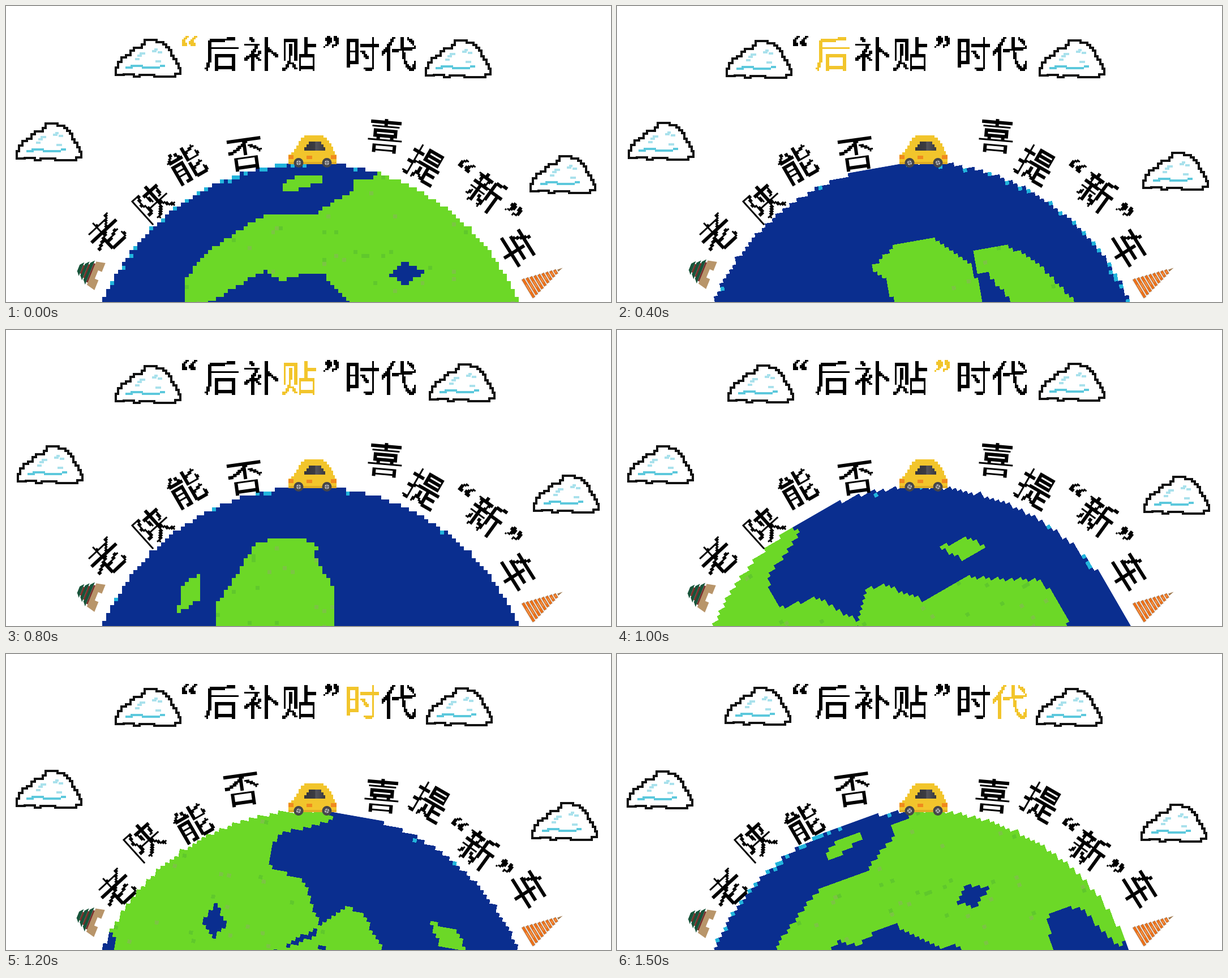
Recreate the animation shown at these times as an HTML page with a canvas. Size 1069 by 524 pixels, loop 1600 ms.

```html
<!DOCTYPE html>
<html lang="zh-CN">
<head>
<meta charset="utf-8">
<title>“后补贴”时代</title>
<style>
html, body { margin: 0; width: 100%; height: 100%; overflow: hidden; background: #fff; }
#stage { position: relative; width: 100%; height: 100%; overflow: hidden; contain: strict; }
#globe {
  position: absolute; left: 142px; top: 279px; width: 792px; height: 792px;
  image-rendering: pixelated;
}
svg { position: absolute; left: 0; top: 0; width: 100%; height: 100%; }
text {
  font: 400 65px "Noto Sans CJK SC", "Noto Sans CJK", sans-serif;
  text-anchor: middle; fill: #000; stroke: #000; stroke-width: .6px; filter: url(#pixel);
}
text.quote { font: 700 62px "Liberation Serif", serif; }
text.hot { fill: #f2c52c; stroke: #f2c52c; }
</style>
</head>
<body>
<div id="stage">
<canvas id="globe" width="114" height="114"></canvas>
<svg id="scene" viewBox="0 0 1069 524">
  <defs>
    <filter id="pixel" color-interpolation-filters="sRGB">
      <feComponentTransfer in="SourceGraphic" result="crisp">
        <feFuncA type="discrete" tableValues="0 1"/>
      </feComponentTransfer>
      <feFlood x="1" y="1" width="1" height="1"/>
      <feComposite x="0" y="0" width="3" height="3"/>
      <feTile result="dots"/>
      <feComposite in="crisp" in2="dots" operator="in"/>
      <feComponentTransfer>
        <feFuncA type="discrete" tableValues="0 1 1 1 1"/>
      </feComponentTransfer>
      <feMorphology operator="dilate" radius="1"/>
    </filter>
    <linearGradient id="glass">
      <stop offset="0" stop-color="#34343a"/><stop offset=".5" stop-color="#3c3c42"/>
      <stop offset=".55" stop-color="#55555c"/><stop offset="1" stop-color="#38383e"/>
    </linearGradient>
    <g id="cloud" fill="none" stroke-width="3.6" shape-rendering="crispEdges">
      <path fill="#fff" stroke="#111" d="M2 64V51H6V41H12V33H20V29H28V21H34V16H48V10H53V2H74V6H86V10H91V15H96V20H100V30H104V36H109V44H113V52H116V62H107V67H70V64H44V67H34V63H16V64Z"/>
      <path stroke="#5cc8dc" d="M19 51H30V48H50M48 51H80M80 48H89"/>
      <path stroke="#a9e1ec" d="M40 30H46V26H54M66 22H72V19H76M76 24H84M36 36H44M72 40H82"/>
    </g>
    <g id="wheel">
      <circle r="8.5" fill="#45454a"/><circle r="4" fill="#b9b9bd"/>
      <path d="M-4 0H4M0-4V4" stroke="#66666b" stroke-width="1.6"/>
    </g>
  </defs>

  <g id="gate"></g>
  <g id="pagoda" transform="translate(921 501) rotate(-31)"></g>

  <g shape-rendering="crispEdges">
    <path fill="#f2c52c" d="M527 229H561V233H567V238H571V243H575V249H578V257H581V263H584V280H499V263H504V259H509V253H513V247H517V239H521V233H527Z"/>
    <path fill="#e0ac24" d="M499 276H584V280H499Z"/>
    <path fill="url(#glass)" d="M527 256V250H531V245H535V240H557V245H561V250H564V256Z"/>
    <path fill="#f08a1e" d="M499 264H508V271H499ZM531 265H541V271H531ZM574 264H584V271H574Z"/>
  </g>
  <use class="wheel" href="#wheel"/>
  <use class="wheel" href="#wheel"/>
</svg>
</div>

<script>
const NS = 'http://www.w3.org/2000/svg';
const $ = id => document.getElementById(id);
const scene = $('scene');
const CX = 538, CY = 675, N = 114, CELL = 792 / N, RADIUS = 398;
const TICKS = 16, STEP = 20;
const rad = deg => deg * Math.PI / 180;

function add(parent, name, attrs) {
  const el = document.createElementNS(NS, name);
  for (const k in attrs) el.setAttribute(k, attrs[k]);
  return parent.appendChild(el);
}
const place = (el, x, y, turn = 0) =>
  el.setAttribute('transform', `translate(${x} ${y}) rotate(${turn})`);

// A rough coastline, outlined on stage with the globe turned by `turn` degrees.
const shape = (turn, outline) => ({
  cos: Math.cos(rad(turn)), sin: Math.sin(rad(turn)), path: new Path2D(`M${outline}Z`)
});
const land = [
  shape(0, '659,280 659,295 612,327 545,368 450,373 370,425 333,460 319,482 319,540 357,540 357,506 455,468 490,487 525,474 560,474 590,507 625,540 1000,540 1000,280'),
  shape(0, '485,327 490,313 515,302 557,302 557,312 510,327'),
  shape(40, '335,570 340,508 380,460 470,452 555,515 555,570'),
  shape(40, '455,435 475,405 525,375 600,385 650,508 620,490 610,465 525,450 480,442'),
  shape(120, '575,570 625,468 665,450 725,482 733,570'),
  shape(180, '372,540 372,488 440,380 485,366 525,366 583,465 577,540'),
  shape(240, '420,540 440,460 470,450 545,480 620,438 735,445 798,515 795,540'),
  shape(240, '568,385 620,368 652,382 615,407'),
  shape(280, '575,270 575,295 480,320 461,372 530,405 550,470 555,540 192,540 192,490 100,490 100,270')
];
const lakes = [
  shape(0, '675,474 705,453 740,470 705,495'),
  shape(280, '550,485 545,500 470,530 510,505')
];

function random(seed) {
  return () => (seed = (seed * 16807) % 2147483647) / 2147483647;
}

function paintGlobe() {
  const g = $('globe').getContext('2d');
  const rnd = random(77);
  const at = i => (i - N / 2 + .5) * CELL;
  const covers = (x, y) => s =>
    g.isPointInPath(s.path, CX + x * s.cos - y * s.sin, CY + x * s.sin + y * s.cos);
  for (let j = 0; j < N; j++) for (let i = 0; i < N; i++) {
    const x = at(i), y = at(j), r = Math.hypot(x, y), hit = covers(x, y);
    if (r > RADIUS) continue;
    const luck = rnd();
    let color;
    if (land.some(hit) && !lakes.some(hit)) {
      color = luck < .009 ? '#60c82c' : luck < .018 ? '#7cc444' : '#6cd827';
    } else {
      const foam = r < RADIUS - CELL ? 0 : x < 0 && y < -90 ? .3 : .04;
      color = luck < foam ? '#22b4dc' : '#0a2e8f';
    }
    g.fillStyle = color;
    g.fillRect(i, j, 1, 1);
  }
}

function paintGate() {
  const tower = $('gate');
  add(tower, 'path', { d: 'M-26 0L-22-16H22L26 0H9V-7H-7V0Z', fill: '#b8956a' });
  for (let i = 0; i < 3; i++) {
    const y = -16 - i * 8, w = 20 - i * 5;
    add(tower, 'rect', { x: -w + 2, y: y - 3, width: 2 * w - 4, height: 3, fill: '#7a2f2a' });
    add(tower, 'path', { d: `M${-w - 3} ${y - 3}H${w + 3}L${w - 4} ${y - 9}H${4 - w}Z`, fill: '#17543a' });
  }
}

function paintPagoda() {
  for (let i = 0; i < 9; i++) {
    const x = i * 7, h = 19 - i * 1.85;
    add($('pagoda'), 'path', { d: `M${x} ${-h}V${h}h5V${-h}Z`, fill: '#ec7018', stroke: '#a08a74', 'stroke-width': .7 });
    add($('pagoda'), 'path', { d: `M${x + 2.5} ${-h * .4}V${h * .4}`, stroke: '#f6a868', 'stroke-width': 1.2 });
  }
  add($('pagoda'), 'path', { d: 'M63 -2L73 0L63 2Z', fill: '#a07a50' });
}

const isQuote = ch => '“”'.includes(ch);
function glyph(ch) {
  const el = add(scene, 'text', { y: isQuote(ch) ? 32 : 24 });
  el.classList.toggle('quote', isQuote(ch));
  el.textContent = ch;
  return el;
}

const title = [['“', 323], ['后', 381], ['补', 451], ['贴', 518], ['”', 576], ['时', 629], ['代', 694]]
  .map(([ch, x]) => {
    const el = glyph(ch);
    place(el, x, isQuote(ch) ? 62 : 85);
    return el;
  });

// character, bearing from the globe's centre, tilt, first bob direction
const arc = [
  ['老', -53, -43, 1], ['陕', -40.5, -42, -1], ['能', -29, -30, 1], ['否', -15.5, -8, -1],
  ['喜', 16.5, 5, 1], ['提', 27, 30, -1], ['“', 35, 38, 1], ['新', 42, 36, 1],
  ['”', 49, 38, 1], ['车', 56, 58, -1]
].map(([ch, bearing, tilt, bob]) => ({
  el: glyph(ch), bearing: rad(bearing), tilt, bob,
  orbit: (bearing < 0 ? 441 : 453) + (isQuote(ch) ? 16 : 0)
}));

const wave = (mid, amp, peak, cycles = 1) =>
  tick => Math.round(mid + amp * Math.cos(2 * Math.PI * cycles * (tick - peak) / TICKS));
const cloud = (x, y) => ({ el: add(scene, 'use', { href: '#cloud' }), x, y, tilt: 0 });
const drifters = [
  cloud(wave(192, 2.5, 2, 2), wave(60, 2, 8)),
  cloud(wave(743.5, 3.5, 7), wave(59, 1, 6, 2)),
  cloud(wave(18, 1.5, 6), wave(205, 1, 0)),
  cloud(wave(928, 3, 8), wave(260, 4.5, 15)),
  { el: $('gate'), x: wave(166, 1, 4), y: wave(477, 2, 0), tilt: -68 }
];
const wheels = [...document.querySelectorAll('.wheel')];

function pose(tick) {
  const step = tick + (tick > 7) + (tick > 9);   // the turn skips two steps
  $('globe').style.transform = `rotate(${step * STEP}deg)`;
  const hot = Math.floor(step * title.length / 18);
  title.forEach((el, i) => el.classList.toggle('hot', i === hot));
  const swing = Math.floor(step / 4.5) % 2 ? -11 : 11;
  for (const { el, bearing, tilt, bob, orbit } of arc) {
    const r = orbit + bob * swing;
    place(el, Math.round(CX + r * Math.sin(bearing)), Math.round(CY - r * Math.cos(bearing)), tilt);
  }
  drifters.forEach(d => place(d.el, d.x(tick), d.y(tick), d.tilt));
  wheels.forEach((w, i) => place(w, 517 + i * 50, 277.5, step * 40));
}

const start = performance.now();
let shown = -1;
function loop() {
  const tick = Math.floor((performance.now() - start) / 100) % TICKS;
  if (tick !== shown) pose(shown = tick);
  requestAnimationFrame(loop);
}
paintGlobe();
paintGate();
paintPagoda();
loop();
</script>
</body>
</html>
```
